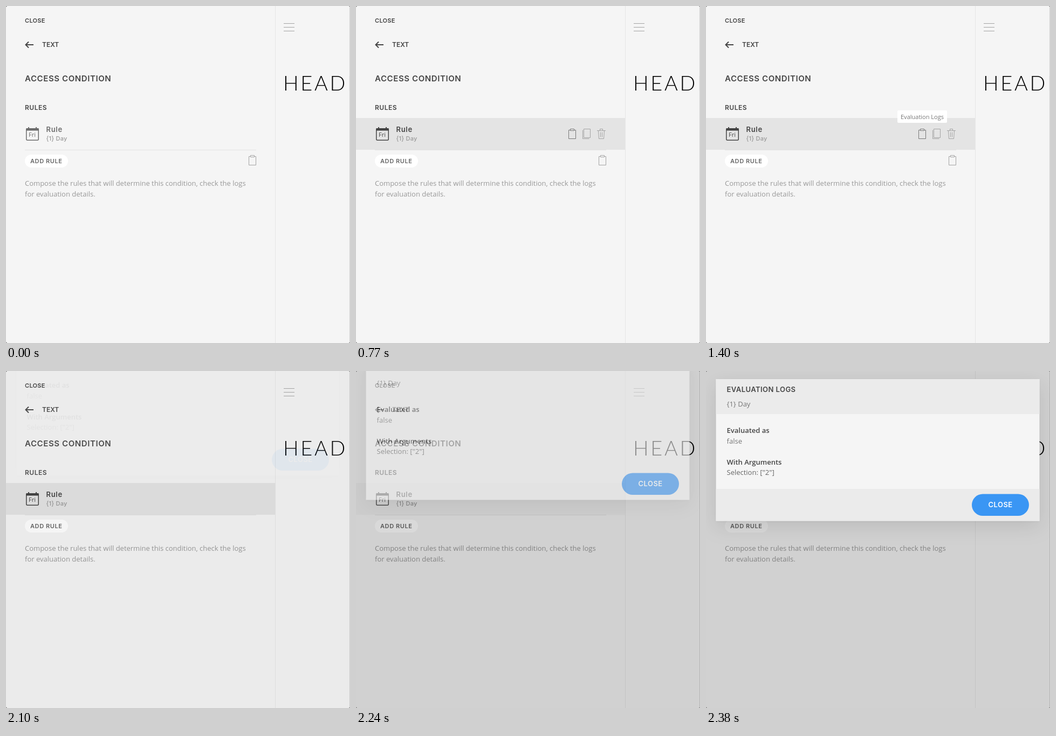
An HTML page that plays this animation: 638x626 px, repeating every 3850 ms.

```html
<!DOCTYPE html>
<html lang="en">
<head>
<meta charset="utf-8">
<title>Access condition logs</title>
<style>
  html, body { margin: 0; width: 100%; height: 100%; overflow: hidden; background: #555; }
  svg { display: block; width: 638px; height: 626px; border-radius: 3px; background: #f5f5f5; }
  text { fill: currentColor; white-space: pre; }

  .ui { font-family: Montserrat, Inter, sans-serif; font-weight: 600; color: #444; }
  .body { font: 13px "Open Sans", sans-serif; color: #999; }
  .s11 { font-size: 11px; letter-spacing: .3px; }
  .s12 { font-size: 12px; }
  .s13 { font-size: 13px; letter-spacing: .45px; }
  .s15 { font-size: 15px; letter-spacing: .6px; }
  .wide { letter-spacing: .5px; }
  .sub { font-size: 11px; font-weight: 500; letter-spacing: .2px; color: #999; }
  .dim { color: #777; }
  .strong { font-weight: 600; color: #444; }
  .headline { font: 300 38px Lato, sans-serif; letter-spacing: 3.6px; color: #000; }
  .icon { fill: none; stroke: currentColor; color: #a3a3a3; }

  .hover, .tools, .ink, .pick, .tip, .logs, .shade, .modal, .bars {
    animation: 3850ms step-end infinite;
  }
  .hover { animation-name: hover; }
  .tools { animation-name: tools; }
  .ink { animation-name: ink; }
  .pick { animation-name: pick; }
  .tip { animation-name: tip; }
  .logs { animation-name: logs; }
  .shade { animation-name: shade; }
  .modal { animation-name: modal; }
  .bars { animation-name: bars; }
  .panel { filter: drop-shadow(0 1px 2px rgba(0,0,0,.06)) drop-shadow(0 10px 18px rgba(0,0,0,.1)); }

  @keyframes hover {
    0% { opacity: 0; }
    3.63% { opacity: .35; }
    5.45% { opacity: .7; }
    7.27% { opacity: 1; }
    56.36% { opacity: .7; }
    58.18% { opacity: .3; }
    59.99%, 100% { opacity: 0; }
  }
  @keyframes tools {
    0% { opacity: 0; }
    3.63% { opacity: .35; }
    5.45% { opacity: .7; }
    7.27% { opacity: 1; }
    54.54%, 100% { opacity: 0; }
  }
  @keyframes ink {
    0% { color: #6c6c6c; }
    3.63% { color: #5e5e5e; }
    5.45% { color: #505050; }
    7.27% { color: #444; }
    58.18% { color: #585858; }
    59.99%, 100% { color: #6c6c6c; }
  }
  @keyframes pick {
    0% { color: #a3a3a3; }
    19.99%, 100% { color: #777; }
  }
  @keyframes tip {
    0% { opacity: 0; }
    34.54% { opacity: .5; }
    36.36% { opacity: 1; }
    54.54%, 100% { opacity: 0; }
  }
  @keyframes logs {
    0% { opacity: 1; }
    54.54%, 100% { opacity: 0; }
  }
  @keyframes shade {
    0% { opacity: 0; }
    54.54% { opacity: .04; }
    56.36% { opacity: .114; }
    58.18%, 100% { opacity: .15; }
  }
  @keyframes modal {
    0% { opacity: 0; transform: translateY(-106px); }
    54.54% { opacity: .06; transform: translateY(-84px); }
    56.36% { opacity: .32; transform: translateY(-61px); }
    58.18% { opacity: .57; transform: translateY(-39px); }
    59.99% { opacity: .82; transform: translateY(-17px); }
    61.81%, 100% { opacity: 1; transform: none; }
  }
  @keyframes bars {
    0% { opacity: 0; }
    61.81%, 100% { opacity: 1; }
  }
</style>
</head>
<body>
<svg viewBox="0 0 638 626">
  <!-- page preview -->
  <path d="M515 32.5h20M515 39.5h20M515 46.5h20" class="icon"/>
  <text x="514" y="156.5" class="headline">HEADL</text>
  <path d="M637.5 0V626" stroke="#d2d2d2"/>

  <!-- sidebar -->
  <path d="M499.5 0V626" stroke="#e6e6e6"/>
  <g class="ui">
    <text x="35" y="31" class="s11">CLOSE</text>
    <path d="M51 72H37M42 66.5L36.5 72L42 77.5" fill="none" stroke="#444" stroke-width="2"/>
    <text x="67" y="76" class="s12">TEXT</text>
    <text x="35" y="140" class="s15">ACCESS CONDITION</text>
    <text x="35" y="193" class="s12 wide">RULES</text>
  </g>

  <path d="M35 267.5H464" stroke="#e2e2e2"/>
  <rect y="208" width="499" height="59" fill="#e4e4e4" class="hover"/>
  <g class="ink">
    <rect x="37.75" y="227.75" width="22.5" height="21.5" rx="2" fill="none" stroke="currentColor" stroke-width="1.5"/>
    <path d="M37.5 227h23v4.5h-23zM41 225h2v3h-2zM55 225h2v3h-2z" fill="currentColor"/>
    <text x="42" y="243" style="font: 11px 'Open Sans', sans-serif">Fri</text>
    <text x="74.5" y="234" style="font: 600 13px Montserrat, Inter, sans-serif; letter-spacing: .7px">Rule</text>
  </g>
  <text x="74.5" y="250" class="ui sub">{1} Day</text>

  <g class="tools">
    <g class="icon pick">
      <path d="M398 230.5H394.5V246.5H407.5V230.5H404M397.5 228.5h7v3h-7z"/>
    </g>
    <g class="icon">
      <path d="M420.5 230.5V246.5H432.5M422.5 228.5h12v16h-12z"/>
      <path d="M447 231.5H463M452.5 231V228.5H457.5V231M449.5 232L450.5 246.5H459.5L460.5 232M453.5 234.5V243.5M456.5 234.5V243.5"/>
    </g>
  </g>

  <rect x="35" y="276" width="80" height="24" rx="12" fill="#fff"/>
  <text x="45" y="291.5" class="ui s11" style="color: #666; letter-spacing: .6px">ADD RULE</text>
  <g class="logs">
    <path class="icon" d="M454 279.5H450.5V295.5H463.5V279.5H460M453.5 277.5h7v3h-7z"/>
  </g>
  <g class="body">
    <text x="35" y="334">Compose the rules that will determine this condition, check the logs</text>
    <text x="35" y="354">for evaluation details.</text>
  </g>

  <g class="tip">
    <rect x="355" y="194" width="92" height="23" rx="2" fill="#fff"/>
    <text x="361" y="210" class="body dim" style="font-size: 11px">Evaluation Logs</text>
  </g>

  <rect width="638" height="626" class="shade"/>

  <!-- log dialog -->
  <g class="modal">
    <rect x="18.5" y="15" width="600" height="263.5" fill="#f5f5f5" class="panel"/>
    <path d="M18.5 15h600v65h-600zM18.5 219h600v59.5h-600z" fill="#ebebeb" class="bars"/>
    <text x="38.5" y="38.5" class="ui s13">EVALUATION LOGS</text>
    <g class="body dim">
      <text x="38.5" y="65.5">{1} Day</text>
      <text x="38.5" y="115" class="strong">Evaluated as</text>
      <text x="38.5" y="134.5">false</text>
      <text x="38.5" y="174" class="strong">With Arguments</text>
      <text x="38.5" y="193" style="color: #666"><tspan font-weight="500">Selection</tspan>: ["2"]</text>
    </g>
    <rect x="493" y="228.5" width="106" height="40.5" rx="20.25" fill="#3a96f4"/>
    <text x="523.5" y="253" class="ui s13" style="color: #fff">CLOSE</text>
  </g>
</svg>
</body>
</html>
```
